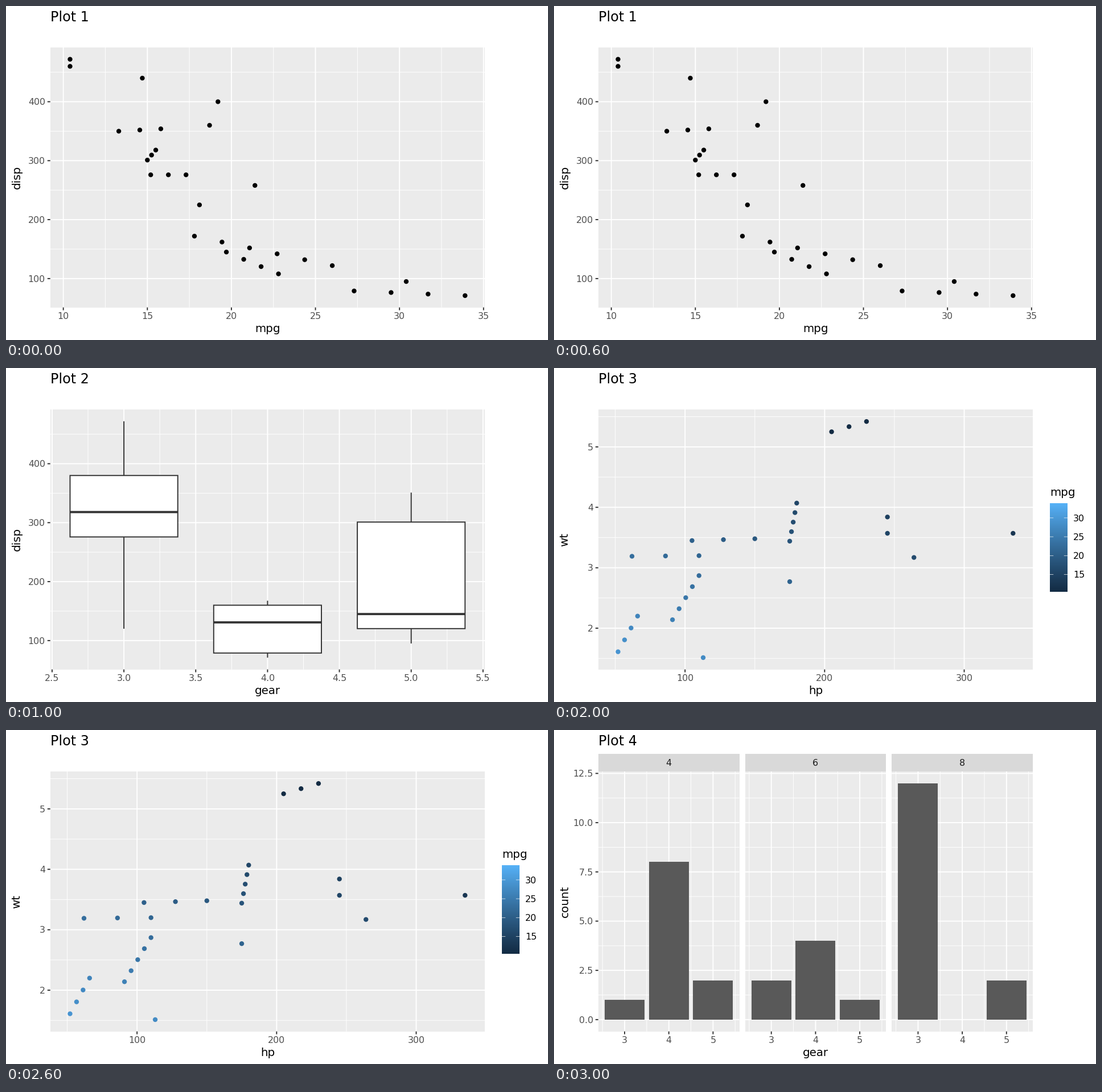
Animation, 952 px wide and 588 px high, one loop 4 s. Source, as a matplotlib script:

```python
import numpy as np
import matplotlib.pyplot as plt
from matplotlib.animation import FuncAnimation
from matplotlib.patches import Circle, Rectangle

W, H, DPI = 952, 588, 64
PT = 72 / DPI         # figure points per pixel
UNIT = 130 / 72       # pixels per theme point
LEFT, RIGHT, TOP, BOTTOM = 77.8, 841.0, 72.96, 530.67
SMALL, MEDIUM, LARGE = 8.8 * UNIT, 11 * UNIT, 13.2 * UNIT
MARGIN, TICK, LINE = 5.5 * UNIT, 2.75 * UNIT, 1.93
CAP = 0.729           # cap height of the font
INK, GREY = "#333333", "#4D4D4D"

plt.rcParams["font.family"] = "DejaVu Sans"
fig = plt.figure(figsize=(W / DPI, H / DPI), dpi=DPI, facecolor="white")
ax = fig.add_axes([0, 0, 1, 1])

# Gradient mixed in CIE Lab
XYZ = np.array([[0.4125, 0.3576, 0.1804], [0.2127, 0.7152, 0.0722], [0.0193, 0.1192, 0.9503]])
WHITE = XYZ.sum(axis=1)
LAB = np.array([[0, 116, 0], [500, -500, 0], [0, 200, -200]])


def rgb_to_lab(rgb):
    rgb = np.array(rgb) / 255
    linear = np.where(rgb > 0.04045, ((rgb + 0.055) / 1.055) ** 2.4, rgb / 12.92)
    t = XYZ @ linear / WHITE
    return LAB @ np.where(t > 0.008856, np.cbrt(t), 7.787 * t + 16 / 116)


def lab_to_rgb(lab):
    f = lab @ np.linalg.inv(LAB).T
    t = np.where(f > 0.2069, f ** 3, (f - 16 / 116) / 7.787)
    linear = np.clip((t * WHITE) @ np.linalg.inv(XYZ).T, 0, 1)
    return np.where(linear > 0.0031308, 1.055 * linear ** (1 / 2.4) - 0.055, 12.92 * linear)


DARK, LIGHT = rgb_to_lab((0x13, 0x2B, 0x43)), rgb_to_lab((0x56, 0xB1, 0xF7))


def blues(t):
    return lab_to_rgb(DARK + np.clip(t, 0, 1)[:, None] * (LIGHT - DARK))


def mpg_level(mpg):
    return (mpg - 10.4) / (33.9 - 10.4)


def run(x0, y0, x1, y1, count):
    """Evenly spaced observations from one point to another."""
    return np.linspace((x0, y0), (x1, y1), count)


def mpg_disp():
    return np.vstack([
        run(10.4, 472, 10.4, 460, 2),
        run(14.7, 440, 19.2, 400, 2),
        run(18.7, 360, 21.4, 258, 2),
        run(13.3, 350, 15.8, 354, 3),
        run(15, 301, 15.5, 318, 3),
        run(15.2, 276, 17.3, 276, 3),
        run(17.8, 172, 26, 122, 6),
        run(19.7, 145, 22.8, 108, 4),
        run(27.3, 79, 33.9, 71.1, 4),
        run(18.1, 225, 30.4, 95, 2),
    ])


def hp_wt():
    return np.vstack([
        run(205, 5.25, 230, 5.42, 3),
        run(245, 3.84, 245, 3.57, 2),
        run(264, 3.17, 335, 3.57, 2),
        run(175, 3.44, 180, 4.07, 5),
        run(105, 3.45, 150, 3.48, 3),
        run(91, 2.14, 110, 2.87, 5),
        run(62, 3.19, 110, 3.2, 3),
        run(52, 1.61, 66, 2.2, 4),
        run(113, 1.513, 175, 2.77, 2),
    ])


def scale(low, high, start, end):
    """Linear scale with 5% padding on both sides."""
    pad = 0.05 * (high - low)
    return lambda v: start + (v - low + pad) / (high - low + 2 * pad) * (end - start)


def line(x0, y0, x1, y1, color, width=LINE):
    ax.plot([x0, x1], [y0, y1], color=color, lw=width * PT,
            solid_capstyle="butt", snap=False)


def rect(x0, y0, x1, y1, color, zorder=1):
    ax.add_patch(Rectangle((x0, y0), x1 - x0, y1 - y0, fc=color, lw=0,
                           snap=True, zorder=zorder))


def text(x, y, label, size, color="black", ha="center", rotation=0):
    ax.text(x, y, label, size=size * PT, color=color, ha=ha, va="baseline",
            rotation=rotation, rotation_mode="anchor")


def titles(title, xlabel, ylabel):
    text(LEFT, MARGIN + CAP * LARGE, title, LARGE, ha="left")
    text((LEFT + RIGHT) / 2, 573.9, xlabel, MEDIUM)
    text(MARGIN + CAP * MEDIUM, (TOP + BOTTOM) / 2, ylabel, MEDIUM, rotation=90)


def panel(sx, sy, xs, ys, xminor, yminor, left=LEFT, right=RIGHT):
    rect(left, TOP, right, BOTTOM, "#EBEBEB")
    for ticks, width in ((yminor, LINE / 2), (ys, LINE)):
        for v in ticks:
            line(left, sy(v), right, sy(v), "white", width)
    for ticks, width in ((xminor, LINE / 2), (xs, LINE)):
        for v in ticks:
            line(sx(v), BOTTOM, sx(v), TOP, "white", width)


def x_axis(sx, xs, fmt):
    for v in xs:
        line(sx(v), BOTTOM, sx(v), BOTTOM + TICK, INK)
        text(sx(v), 551.2, format(v, fmt), SMALL, GREY)


def y_axis(sy, ys, fmt):
    for v in ys:
        line(LEFT - TICK, sy(v), LEFT, sy(v), INK)
        text(LEFT - 1.8 * TICK, sy(v) + CAP * SMALL / 2, format(v, fmt), SMALL, GREY, ha="right")


def framed(sx, sy, xs, ys, xminor, yminor, xfmt=".0f"):
    panel(sx, sy, xs, ys, xminor, yminor)
    x_axis(sx, xs, xfmt)
    y_axis(sy, ys, ".0f")


def dots(xs, ys, colors):
    for x, y, color in zip(xs, ys, colors):
        ax.add_patch(Circle((x, y), 4.17, fc=color, lw=0, zorder=3))


def disp_scale():
    return scale(71.1, 472, BOTTOM, TOP), range(100, 401, 100), range(150, 451, 100)


def scatter_plot():
    mpg, disp = mpg_disp().T
    sx = scale(10.4, 33.9, LEFT, RIGHT)
    sy, ys, yminor = disp_scale()
    framed(sx, sy, range(10, 36, 5), ys, np.arange(12.5, 33, 5), yminor)
    dots(sx(mpg), sy(disp), ["black"] * len(mpg))
    titles("Plot 1", "mpg", "disp")


def box(x, x0, x1, low, q1, median, q3, high):
    line(x, q3, x, high, INK)
    line(x, q1, x, low, INK)
    ax.add_patch(Rectangle((x0, q3), x1 - x0, q1 - q3, fc="white", ec=INK, lw=LINE * PT,
                           joinstyle="miter", snap=False, zorder=2))
    line(x0, median, x1, median, INK, 2 * LINE)


def box_plot():
    sx = scale(2.625, 5.375, LEFT, RIGHT)
    sy, ys, yminor = disp_scale()
    framed(sx, sy, np.arange(2.5, 5.6, 0.5), ys, np.arange(2.75, 5.3, 0.5), yminor, ".1f")
    summaries = {3: (120.1, 275.8, 318, 380, 472),
                 4: (71.1, 78.9, 130.9, 160, 167.6),
                 5: (95.1, 120.3, 145, 301, 351)}
    for gear, summary in summaries.items():
        box(sx(gear), sx(gear - 0.375), sx(gear + 0.375), *(sy(v) for v in summary))
    titles("Plot 2", "gear", "disp")


def color_bar():
    x0, x1, y0, y1 = 871, 902, 238, 394
    text(x0, 225, "mpg", MEDIUM, ha="left")
    ax.imshow(blues(np.linspace(1, 0, y1 - y0))[:, None], extent=(x0, x1, y1, y0),
              aspect="auto", interpolation="nearest")
    notch = (x1 - x0) / 5
    for v in (15, 20, 25, 30):
        y = y1 + mpg_level(v) * (y0 - y1)
        line(x0, y, x0 + notch, y, "white", 0.68)
        line(x1 - notch, y, x1, y, "white", 0.68)
        text(x1 + MARGIN, y + CAP * SMALL / 2, str(v), SMALL, ha="left")


def colored_plot():
    hp, wt = hp_wt().T
    sx = scale(52, 335, LEFT, RIGHT)
    sy = scale(1.513, 5.424, BOTTOM, TOP)
    framed(sx, sy, (100, 200, 300), range(2, 6), (50, 150, 250), np.arange(1.5, 5.6))
    # Mileage falls with weight and power
    mpg = 37.2 - 3.88 * wt - 0.032 * hp
    dots(sx(hp), sy(wt), blues(mpg_level(mpg)))
    color_bar()
    titles("Plot 3", "hp", "wt")


def bar_plot():
    width = (RIGHT - LEFT - 2 * MARGIN) / 3
    sy = scale(0, 12, BOTTOM, TOP)
    ys = np.arange(0, 12.6, 2.5)
    gears = (3, 4, 5)
    facets = {4: (1, 8, 2), 6: (2, 4, 1), 8: (12, 0, 2)}
    for i, (cyl, counts) in enumerate(facets.items()):
        left = LEFT + i * (width + MARGIN)
        right = left + width
        sx = scale(2.55, 5.45, left, right)
        panel(sx, sy, gears, ys, np.arange(2.5, 5.6), ys[:-1] + 1.25, left, right)
        rect(left, 42.2, right, TOP, "#D9D9D9")
        text((left + right) / 2, 63.4, str(cyl), SMALL, "#1A1A1A")
        for gear, count in zip(gears, counts):
            if count:
                rect(sx(gear - 0.45), sy(count), sx(gear + 0.45), sy(0), "#595959", zorder=3)
        x_axis(sx, gears, "d")
    y_axis(sy, ys, ".1f")
    titles("Plot 4", "gear", "count")


PLOTS = (scatter_plot, box_plot, colored_plot, bar_plot)


def draw(frame):
    ax.clear()
    ax.set_axis_off()
    ax.set(xlim=(0, W), ylim=(H, 0))
    ax.set_autoscale_on(False)
    PLOTS[frame % len(PLOTS)]()
    return []


anim = FuncAnimation(fig, draw, frames=len(PLOTS), interval=1000,
                     repeat=True, repeat_delay=0, blit=False)
plt.show()
```
